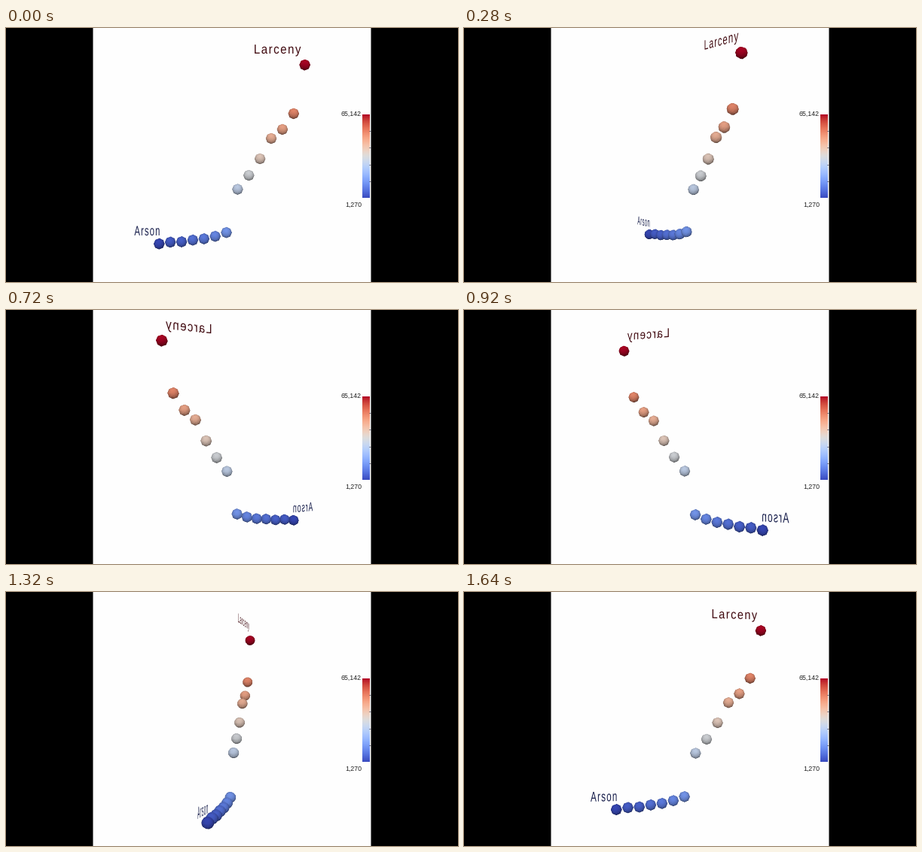
A matplotlib script that plays this animation: 600x338 px, repeating every 1.68 s.

```python
import numpy as np
import matplotlib.pyplot as plt
from matplotlib.animation import FuncAnimation
from matplotlib.collections import TriMesh
from matplotlib.patches import PathPatch, Rectangle
from matplotlib.path import Path
from matplotlib.textpath import TextPath
from matplotlib.tri import Triangulation

W, H, DPI = 600, 338, 100
FRAMES, INTERVAL = 42, 40
TURN_STEPS = 49
CX, CY = 300, 169
SPAN = 96.5            # half length of the row of points
PERSPECTIVE = 0.152
RADIUS = 6.75
FONT = "Liberation Sans"
TRACKING = 0.1         # extra letter spacing, in em
LIGHT = np.array([-0.08, -0.55, 0.83])

heights = np.array([287, 284.8, 284.3, 282, 280.3, 277, 272,
                    214.5, 196, 174, 147, 135, 114, 49.3])
count = len(heights)
centres = np.column_stack([np.linspace(-SPAN, SPAN, count),
                           heights - CY, np.zeros(count)])
level = (heights.max() - heights) / np.ptp(heights)
cmap = plt.get_cmap("coolwarm")
# Colour rises fast among the lowest points, then linearly
colours = cmap(0.83 * level + 0.17 * (1 - np.exp(-level / 0.03)))[:, :3]


def unit_sphere(around=8, rings=6):
    """Low-poly sphere with its poles on the z axis."""
    phi = np.pi * np.arange(1, rings + 1) / (rings + 1)
    theta = 2 * np.pi * np.arange(around) / around
    p, t = np.meshgrid(phi, theta, indexing="ij")
    body = np.stack([np.sin(p) * np.cos(t), np.sin(p) * np.sin(t), np.cos(p)], -1)
    verts = np.vstack([body.reshape(-1, 3), [[0, 0, 1], [0, 0, -1]]])
    north, south = rings * around, rings * around + 1
    last = (rings - 1) * around
    tris = []
    for a in range(around):
        b = (a + 1) % around
        tris += [(north, a, b), (south, last + a, last + b)]
        for r in range(0, last, around):
            tris += [(r + a, r + b, r + around + a),
                     (r + b, r + around + b, r + around + a)]
    return verts, np.array(tris)


ball, ball_tris = unit_sphere()


def turn(pts, angle):
    c, s = np.cos(angle), np.sin(angle)
    x, y, z = np.moveaxis(np.asarray(pts), -1, 0)
    return np.stack([x * c - z * s, y, x * s + z * c], -1)


def project(pts, angle):
    q = turn(pts, angle)
    scale = 1 / (1 - PERSPECTIVE * q[..., 2:] / SPAN)
    return np.array([CX, CY]) + q[..., :2] * scale


fig = plt.figure(figsize=(W / DPI, H / DPI), dpi=DPI, facecolor="black")
ax = fig.add_axes([0, 0, 1, 1])
ax.axis("off")
ax.add_patch(Rectangle((115.5, -1), 369, H + 2, fc="#fefefe", lw=0, snap=False))

# Colour bar
ax.imshow(np.linspace(1, 0, 256)[:, None], cmap=cmap, aspect="auto",
          extent=(473, 483, 226, 115), interpolation="bilinear", zorder=2)
ax.set_xlim(0, W)
ax.set_ylim(H, 0)
for y in np.linspace(115, 226, 6)[1:-1]:
    ax.plot([482, 484], [y, y], color="#444455", lw=0.5, zorder=3)
for y, label in ((113, "65,142"), (234.8, "1,270")):
    ax.text(471.8, y, label, family=FONT, size=8.8 * 72 / DPI, color="#222222",
            ha="right", va="center_baseline")


def glyphs(text, em):
    return TextPath((0, 0), text, size=em, prop={"family": FONT})


def right_edge(text, em):
    return glyphs(text, em).get_extents().x1


def spaced_text(word, em):
    """Outline of a word with extra space between its letters."""
    verts, codes = [], []
    for i, letter in enumerate(word):
        start = right_edge(word[:i] + "l", em) - right_edge("l", em)
        outline = glyphs(letter, em)
        verts.append(outline.vertices + [start + i * TRACKING * em, 0])
        codes.append(outline.codes)
    return np.vstack(verts), np.concatenate(codes)


def make_label(word, x, y, em, condense, colour):
    v, codes = spaced_text(word, em)
    flat = np.column_stack([x + v[:, 0] * condense, y - v[:, 1], np.zeros(len(v))])
    patch = PathPatch(Path(flat[:, :2], codes), fc=colour, lw=0, zorder=4)
    ax.add_patch(patch)
    return patch, flat, codes


labels = [
    make_label("Larceny", 28.9, -135, 17.3, 0.87, "#3f080e"),
    make_label("Arson", -129.6, 107, 18.2, 0.62, "#181f4c"),
]


def make_balls(angle):
    pts = centres[:, None] + RADIUS * ball
    xy = project(pts, angle).reshape(-1, 2)
    normals = turn(ball, angle)
    shade = 0.2 + 0.75 * (0.5 + 0.5 * normals @ LIGHT)
    rgb = np.clip(colours[:, None] * shade[:, None], 0, 1).reshape(-1, 3)

    facing = normals[ball_tris, 2].mean(axis=1)
    order = np.argsort(facing)
    front = ball_tris[order[facing[order] > 0]]
    far_to_near = np.argsort(turn(centres, angle)[:, 2], kind="stable")
    tris = np.vstack([front + i * len(ball) for i in far_to_near])

    mesh = TriMesh(Triangulation(xy[:, 0], xy[:, 1], tris), zorder=5)
    mesh.set_facecolor(np.column_stack([rgb, np.ones(len(rgb))]))
    return mesh


meshes = []


def update(n):
    # The turn skips one step in every six
    step = max(n, (12 * n - 5) // 10)
    angle = 2 * np.pi * step / TURN_STEPS
    for patch, flat, codes in labels:
        patch.set_path(Path(project(flat, angle), codes))
    while meshes:
        meshes.pop().remove()
    meshes.append(ax.add_collection(make_balls(angle), autolim=False))
    return [patch for patch, _, _ in labels] + meshes


anim = FuncAnimation(fig, update, frames=FRAMES, interval=INTERVAL,
                     repeat=True, repeat_delay=0, blit=False)
plt.show()
```
